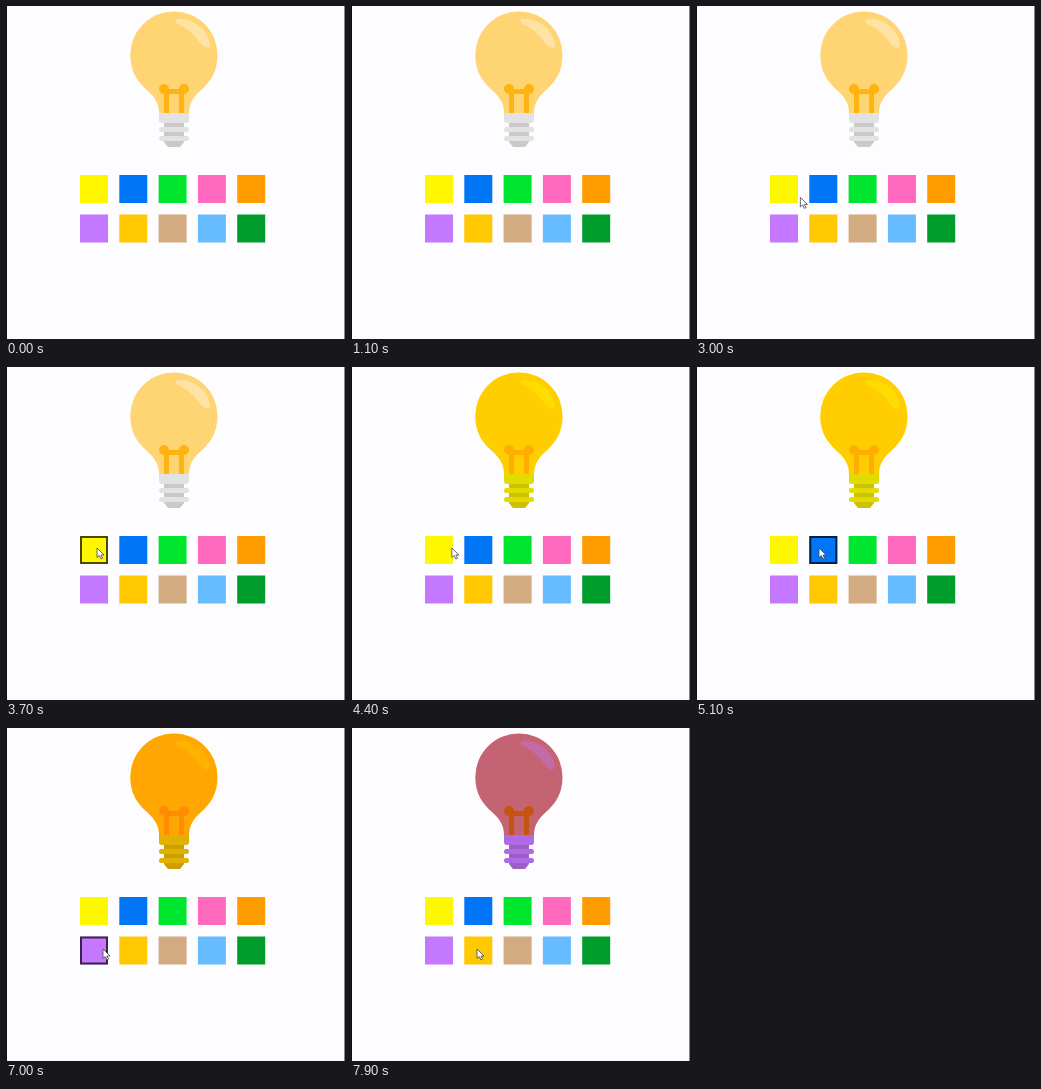
These frames come from a looping animation (339x333 px, 8 s). An HTML page with a canvas:

```html
<!DOCTYPE html>
<html lang="en">
<head>
<meta charset="utf-8">
<title>Bulb colours</title>
<style>
html, body { margin: 0; width: 100%; height: 100%; overflow: hidden; background: #fdfcfe; }
canvas { display: block; }
</style>
</head>
<body>
<canvas id="stage" width="339" height="333"></canvas>
<script>
const ctx = document.getElementById('stage').getContext('2d');
const LOOP = 8000, STEP = 100, SIZE = 28, CLICK_DELAY = 400, MID = 168;

const swatches = ['#fff700', '#0075f5', '#00e62e', '#ff69be', '#ff9c00',
                  '#c478ff', '#ffc800', '#d2ab80', '#66bcff', '#009c2c']
  .map((color, i) => ({
    color,
    x: 74 + 39.3 * (i % 5),
    y: 169 + 39.5 * Math.floor(i / 5)
  }));

// The pointer enters at (226, 286), then rests on one swatch after another
const moves = [
  { start: 1750, end: 3500, x: 91, y: 181 },
  { start: 4300, end: 4800, x: 123, y: 181 },
  { start: 5600, end: 5900, x: 117, y: 214 },
  { start: 6500, end: 6800, x: 97, y: 221 },
  { start: 7400, end: 8000, x: 127, y: 221 }
];
moves.forEach((move, i) => {
  move.from = moves[i - 1] || { x: 226, y: 286 };
  move.swatch = swatches.find(s =>
    move.x >= s.x && move.x < s.x + SIZE && move.y >= s.y && move.y < s.y + SIZE);
});

function makeBulb() {
  const glass = new Path2D('M153 107C153 98 149 91 141 84C132 76 124.3 66 124.3 49' +
    'A43.6 43.6 0 0 1 211.5 49C211.5 66 204 76 195 84C187 91 183 98 183 107Z');
  const shine = new Path2D('M171 13C185 11 203 23 204 39C203 44 197 41 194 37C188 28 181 22 172 18C169 16 169 14 171 13Z');
  const core = new Path2D('M158 116H178V136L174 141H162L158 136Z');

  const cap = new Path2D();
  cap.roundRect(MID - 15, 107, 30, 10, [0, 0, 3, 3]);
  for (const y of [121, 130]) cap.roundRect(MID - 15, y, 30, 5, 2.5);

  const filament = new Path2D();
  filament.rect(MID - 8, 83, 16, 5);
  for (const side of [-1, 1]) {
    const knob = new Path2D();
    knob.arc(MID + side * 10, 83, 5, 0, 7);
    filament.addPath(knob);
    filament.rect(MID + side * 7.5 - 2.5, 83, 5, 24);
  }

  return [['#cdc8c8', core], ['#e2e2e4', cap], ['#ffd473', glass],
          ['#ffe3a5', shine], ['#ffb310', filament]];
}

const bulb = makeBulb();
const outline = new Path2D();
bulb.forEach(([, path]) => outline.addPath(path));
const arrow = new Path2D('M0 0V9.5L2.3 7.5L4 11L5.6 10.2L4 7H7Z');

function paintBulb(tint) {
  for (const [fill, path] of bulb) {
    ctx.fillStyle = fill;
    ctx.fill(path);
  }
  if (!tint) return;
  ctx.save();
  ctx.clip(outline);
  ctx.globalCompositeOperation = 'multiply';
  ctx.fillStyle = tint;
  ctx.fillRect(120, 0, 96, 145);
  ctx.restore();
}

function paintPointer({ start, end, from, x, y }, t) {
  const p = Math.sin(Math.min(1, (t - start) / (end - start)) * Math.PI / 2);
  ctx.save();
  ctx.translate(from.x + (x - from.x) * p, from.y + (y - from.y) * p);
  ctx.fillStyle = '#fff';
  ctx.fill(arrow);
  ctx.strokeStyle = '#444';
  ctx.lineWidth = 0.8;
  ctx.stroke(arrow);
  ctx.restore();
}

function draw(t) {
  ctx.fillStyle = '#fdfcfe';
  ctx.fillRect(0, 0, 339, 333);
  ctx.fillStyle = '#111';
  ctx.fillRect(0, 0, 1, 333);
  ctx.fillStyle = '#888';
  ctx.fillRect(338, 0, 1, 333);

  const clicked = moves.filter(m => t >= m.end + CLICK_DELAY).pop();
  paintBulb(clicked && clicked.swatch.color);

  for (const { color, x, y } of swatches) {
    ctx.fillStyle = color;
    ctx.fillRect(x, y, SIZE, SIZE);
  }

  const move = moves.filter(m => t >= m.start).pop();
  if (!move) return;
  if (t >= move.end) {
    ctx.strokeStyle = 'rgba(0,0,0,0.7)';
    ctx.lineWidth = 2;
    ctx.strokeRect(move.swatch.x + 1, move.swatch.y + 1, SIZE - 2, SIZE - 2);
  }
  paintPointer(move, t);
}

function frame() {
  const t = performance.now() % LOOP;
  draw(Math.floor(t / STEP) * STEP);
  requestAnimationFrame(frame);
}
frame();
</script>
</body>
</html>
```
